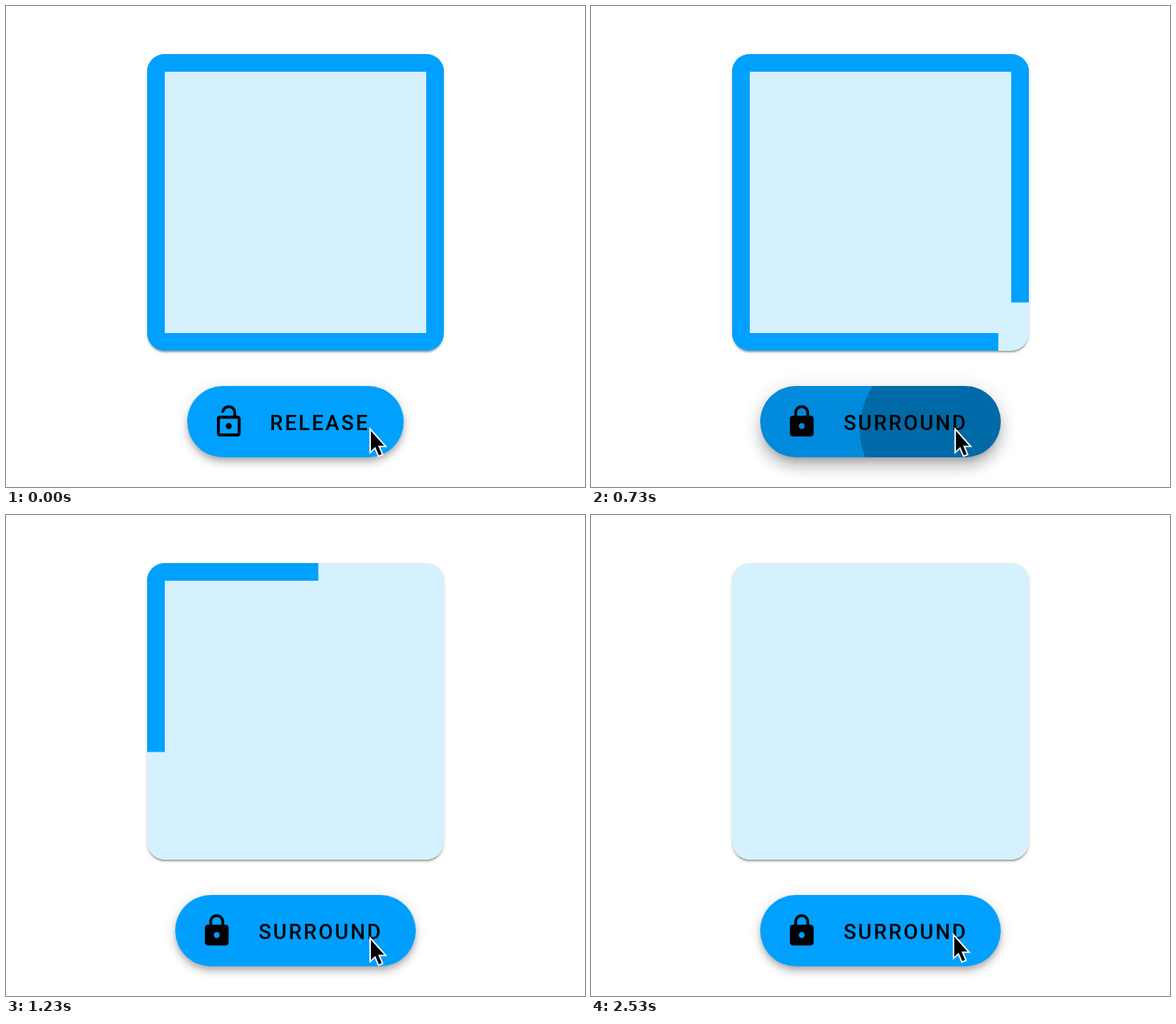
An HTML page with a canvas that plays this animation: 722 by 600 pixels, repeating every 2.56 s.

```html
<!DOCTYPE html>
<html lang="en">
<head>
<meta charset="utf-8">
<title>Surround / Release</title>
<style>
html, body { margin: 0; width: 100%; height: 100%; overflow: hidden; background: #fff; }
canvas { display: block; font-family: Roboto, sans-serif; }
</style>
</head>
<body>
<canvas id="stage" width="722" height="600"></canvas>
<script>
const ctx = document.getElementById('stage').getContext('2d');
const LOOP = 2560;
const CLICK = 570;
const BLUE = '#00a0ff';
const PALE = '#d6f1fe';
const BOX = { x: 176, y: 60, size: 370, radius: 22, border: 22 };
const ICON_SCALE = 1.85;

const OPEN_LOCK = new Path2D('M12 17c1.1 0 2-.9 2-2s-.9-2-2-2-2 .9-2 2 .9 2 2 2zm6-9h-1V6c0-2.76-2.24-5-5-5S7 3.24 7 6h1.9c0-1.71 1.39-3.1 3.1-3.1 1.71 0 3.1 1.39 3.1 3.1v2H6c-1.1 0-2 .9-2 2v10c0 1.1.9 2 2 2h12c1.1 0 2-.9 2-2V10c0-1.1-.9-2-2-2zm0 12H6V10h12v10z');
const CLOSED_LOCK = new Path2D('M18 8h-1V6c0-2.76-2.24-5-5-5S7 3.24 7 6v2H6c-1.1 0-2 .9-2 2v10c0 1.1.9 2 2 2h12c1.1 0 2-.9 2-2V10c0-1.1-.9-2-2-2zm-6 9c-1.1 0-2-.9-2-2s.9-2 2-2 2 .9 2 2-.9 2-2 2zm3.1-9H8.9V6c0-1.71 1.39-3.1 3.1-3.1 1.71 0 3.1 1.39 3.1 3.1v2z');
const ARROW = new Path2D('M2 3V28L7.5 23L12 33.5L15.5 32L11 21.5H18.5Z');

const clamp = v => Math.min(1, Math.max(0, v));
const mix = (a, b, k) => a + (b - a) * k;
const phase = (t, start, duration) => clamp((t - start) / duration);

// Cubic Bézier easing whose y control values are 0 and 1
function bezier(x1, x2) {
  return x => {
    let lo = 0, hi = 1;
    for (let i = 0; i < 24; i++) {
      const s = (lo + hi) / 2, q = 1 - s;
      if (3 * x1 * s * q * q + 3 * x2 * s * s * q + s * s * s < x) lo = s; else hi = s;
    }
    return lo * lo * (3 - 2 * lo);
  };
}
const easeIn = bezier(.42, 1);
const easeOut = bezier(0, .58);
const rippleEase = bezier(0, .2);

// Linear interpolation through [time, value] stops
function track(t, stops) {
  let [t0, v0] = stops[0];
  if (t <= t0) return v0;
  for (const [t1, v1] of stops) {
    if (t < t1) return mix(v0, v1, (t - t0) / (t1 - t0));
    t0 = t1;
    v0 = v1;
  }
  return v0;
}

function roundRect(x, y, w, h, r) {
  ctx.beginPath();
  ctx.roundRect(x, y, w, h, r);
}

function shadow(x, y, w, h, r, dy, blur, spread, alpha) {
  ctx.save();
  ctx.shadowColor = `rgba(0,0,0,${alpha})`;
  ctx.shadowBlur = blur;
  // Only the shadow lands on the stage
  ctx.shadowOffsetX = 2000;
  ctx.shadowOffsetY = dy;
  ctx.fillStyle = '#000';
  roundRect(x - spread - 2000, y - spread, w + 2 * spread, h + 2 * spread, Math.max(0, r + spread));
  ctx.fill();
  ctx.restore();
}

function drawBox(t) {
  const { x, y, size, radius, border } = BOX;
  const remaining = (ease, start, duration) => size * (1 - ease(phase(t, start, duration)));
  const right = remaining(easeIn, 543, 551);
  const bottom = remaining(easeIn, 595, 515);
  const top = remaining(easeOut, 1093, 487);
  const left = remaining(easeOut, 1110, 506);
  const inner = size - border;

  shadow(x, y, size, size, radius, 3.7, 1.85, -1.85, .2);
  shadow(x, y, size, size, radius, 1.85, 1.85, 0, .14);
  shadow(x, y, size, size, radius, 1.85, 5.5, 0, .12);

  ctx.save();
  roundRect(x, y, size, size, radius);
  ctx.fillStyle = PALE;
  ctx.fill();
  ctx.clip();
  ctx.fillStyle = BLUE;
  ctx.fillRect(x, y, top, top > 0 ? border : 0);
  ctx.fillRect(x, y, border, left);
  if (right > 0) ctx.fillRect(x + inner, y, border, Math.min(right, size));
  if (bottom > inner) {
    ctx.fillRect(x, y + inner, inner, border);
    ctx.beginPath();
    ctx.moveTo(x + inner, y + inner);
    ctx.lineTo(x + size, y + inner + 14);
    ctx.lineTo(x + size, y + size);
    ctx.lineTo(x + inner, y + size);
    ctx.fill();
  } else {
    ctx.fillRect(x, y + inner, bottom, border);
  }
  ctx.restore();
}

function drawButton(t) {
  const surround = t >= CLICK;
  const x = surround ? 211 : 226;
  const w = surround ? 300 : 270;
  const y = 474, h = 89, r = h / 2;
  const lift = track(t, [[CLICK, 0], [640, 1], [690, 1], [850, 0]]);

  shadow(x, y, w, h, r, mix(3.7, 9.2, lift), mix(7.4, 9.2, lift), mix(-1.85, -5.5, lift), .2);
  shadow(x, y, w, h, r, mix(7.4, 14.8, lift), mix(9.2, 18.5, lift), mix(0, 1.85, lift), .14);
  shadow(x, y, w, h, r, mix(1.85, 5.5, lift), mix(18.5, 26, lift), mix(0, 3.7, lift), .12);

  ctx.save();
  roundRect(x, y, w, h, r);
  ctx.fillStyle = BLUE;
  ctx.fill();
  ctx.clip();
  const shade = track(t, [[600, 0], [670, .075], [800, .215], [880, .215], [1070, .108], [1240, 0]]);
  ctx.fillStyle = `rgba(0,0,0,${shade})`;
  ctx.fillRect(x, y, w, h);
  const ripple = track(t, [[661, .24], [780, .24], [870, .11], [960, 0]]);
  if (t > 661 && ripple > 0) {
    ctx.fillStyle = `rgba(0,0,0,${ripple})`;
    ctx.beginPath();
    ctx.arc(432, 528, 230 * rippleEase(phase(t, 661, 450)), 0, Math.PI * 2);
    ctx.fill();
  }
  ctx.restore();

  ctx.fillStyle = '#000';
  ctx.save();
  ctx.translate(x + 29.6, 496.2);
  ctx.scale(ICON_SCALE, ICON_SCALE);
  ctx.fill(surround ? CLOSED_LOCK : OPEN_LOCK);
  ctx.restore();

  ctx.font = '500 26px Roboto, sans-serif';
  ctx.letterSpacing = '2.4px';
  ctx.fillText(surround ? 'SURROUND' : 'RELEASE', x + (surround ? 104 : 103), 529);
}

function drawCursor(t) {
  const move = phase(t, 2320, 200);
  ctx.save();
  ctx.translate(mix(453, 451, move), mix(527, 523, move));
  ctx.lineWidth = 3.6;
  ctx.strokeStyle = '#fff';
  ctx.stroke(ARROW);
  ctx.fillStyle = '#000';
  ctx.fill(ARROW);
  ctx.restore();
}

const start = performance.now();
function frame() {
  const t = (performance.now() - start) % LOOP;
  ctx.fillStyle = '#fff';
  ctx.fillRect(0, 0, 722, 600);
  drawBox(t);
  drawButton(t);
  drawCursor(t);
  requestAnimationFrame(frame);
}
frame();
</script>
</body>
</html>
```
